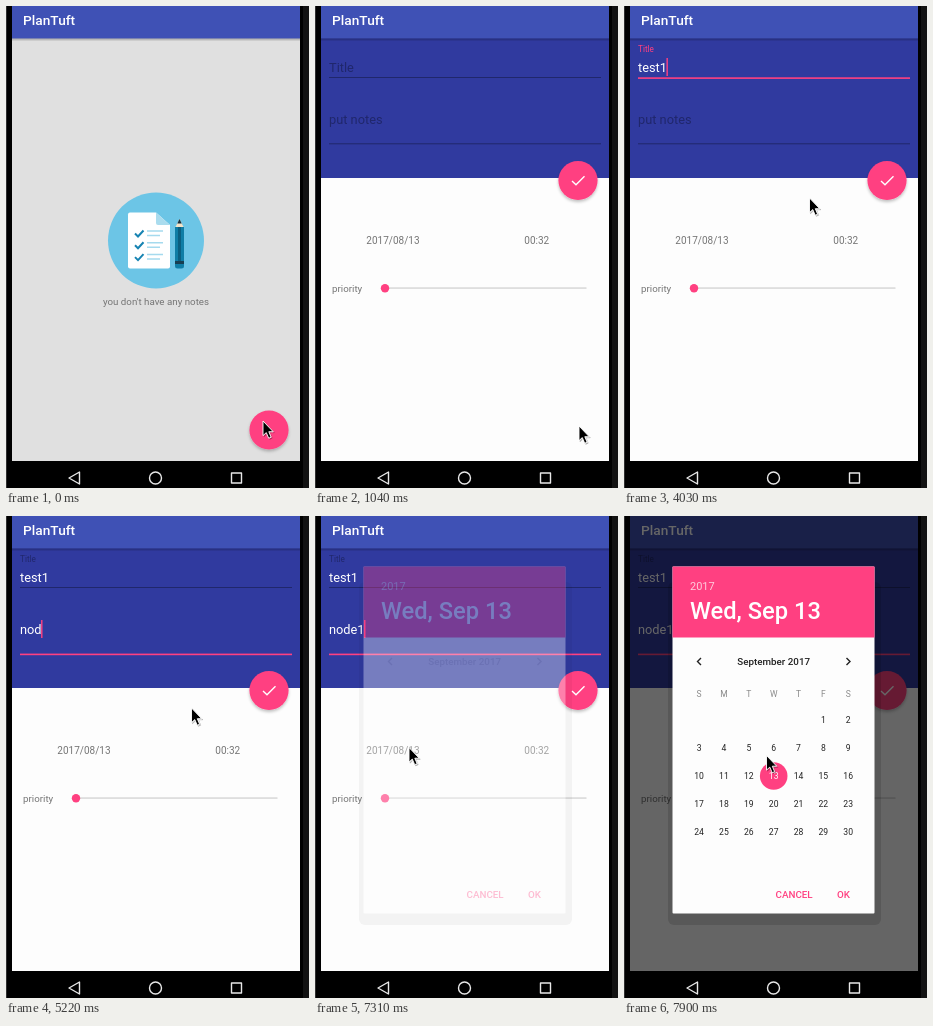
An HTML page that plays this animation: 303x482 px, repeating every 8000 ms.

```html
<!DOCTYPE html>
<html lang="en">
<head>
<meta charset="utf-8">
<title>Notes app</title>
<style>
  html, body { margin: 0; width: 100%; height: 100%; overflow: hidden; background: #000; }
  svg { display: block; width: 303px; height: 482px; font-family: Roboto, "Open Sans", sans-serif; }
  .small { font-size: 9.75px; fill: #757575; }
  .value { font-size: 10px; fill: #757575; }
  .field { font-size: 12.8px; fill: #fff; white-space: pre; }
  .hint { fill: #20276c; }
  .medium { font-weight: 500; }
  .mid { text-anchor: middle; }
  .pink { fill: #ff4081; }
  .line { fill: none; stroke-linecap: butt; }
</style>
</head>
<body>
<svg viewBox="0 0 303 482">
  <defs>
    <filter id="lift" x="-30%" y="-30%" width="160%" height="170%">
      <feDropShadow dx="0" dy="2" stdDeviation="1.8" flood-color="#000" flood-opacity=".24"/>
    </filter>
    <filter id="near" x="-30%" y="-30%" width="170%" height="170%">
      <feDropShadow dx="1" dy="1" stdDeviation=".7" flood-color="#000" flood-opacity=".3"/>
    </filter>
    <filter id="soft" x="-10%" y="-10%" width="120%" height="120%">
      <feGaussianBlur stdDeviation=".7"/>
    </filter>
    <linearGradient id="fade" x2="0" y2="1">
      <stop stop-color="#000" stop-opacity=".26"/>
      <stop offset="1" stop-color="#000" stop-opacity="0"/>
    </linearGradient>
    <clipPath id="screen"><rect x="6" width="288" height="455"/></clipPath>
  </defs>
  <rect width="303" height="482"/>
  <rect width="1" height="482" fill="#303030"/>
  <rect x="297" width="6" height="482" fill="#121212"/>

  <g clip-path="url(#screen)">
    <g id="home">
      <rect x="6" width="288" height="455" fill="#e0e0e0"/>
      <circle cx="150" cy="234.5" r="48" fill="#6cc5e6"/>
      <path d="M124 206.5H150L164 219V260.5Q164 262.5 162 262.5H124Q122 262.5 122 260.5V208.5Q122 206.5 124 206.5Z" fill="#fff"/>
      <path d="M150 206.5L164 219H152Q150 219 150 217Z" fill="#aadcee"/>
      <g id="items"></g>
      <path d="M169 222L173.5 213L178 222Z" fill="#f3e3c8"/>
      <path d="M171.3 217.5L173.5 213L175.7 217.5Z" fill="#17313f"/>
      <path d="M169 221H178V260Q178 262.5 175.5 262.5H171.5Q169 262.5 169 260Z" fill="#0f7ea6"/>
      <path d="M172 221H175V257H172Z" fill="#0a5f80"/>
      <path d="M169 255H178V258H169Z" fill="#173f52"/>
      <text class="small mid" x="150" y="298.5">you don't have any notes</text>
      <circle class="pink" cx="263" cy="424" r="19.6" filter="url(#lift)"/>
    </g>

    <g id="editor">
      <rect x="6" y="171" width="288" height="284" fill="#fdfdfd"/>
      <rect x="6" y="32" width="288" height="140" fill="#303a9f"/>
      <text id="label" class="hint" x="14">Title</text>
      <text id="title" class="field" x="14" y="66"></text>
      <rect id="titleLine" x="14" width="272"/>
      <text id="notesHint" class="field hint" x="14" y="118">put notes</text>
      <text id="notes" class="field" x="14" y="118"></text>
      <rect id="notesLine" x="14" width="272"/>
      <rect id="caret" class="pink" width="1.4" height="18"/>
      <text class="value" x="51.3" y="238">2017/08/13</text>
      <text class="value" x="209.3" y="238">00:32</text>
      <text class="small" x="17" y="286">priority</text>
      <rect x="70" y="281.2" width="201.5" height="1.8" fill="#dedede"/>
      <circle class="pink" cx="70" cy="282.3" r="4.2"/>
      <circle class="pink" cx="263" cy="174.5" r="19.6" filter="url(#lift)"/>
      <path class="line" d="M257 175L261 178.8L269.5 170.3" stroke="#fff" stroke-width="1.4"/>
    </g>

    <rect x="6" width="288" height="32.5" fill="#3f51b5"/>
    <rect x="6" y="32.5" width="288" height="3" fill="url(#fade)"/>
    <text class="medium" x="17" y="18.5" font-size="13.7" fill="#fff">PlanTuft</text>

    <rect id="dim" x="6" width="288" height="455" opacity="0"/>
    <g id="dialog">
      <rect x="44" y="66" width="213" height="343" rx="6" opacity=".12" filter="url(#soft)"/>
      <rect x="48.5" y="50.5" width="202" height="347" rx="1" fill="#fdfdfd"/>
      <rect class="pink" x="48.5" y="50.5" width="202" height="71"/>
      <text x="66" y="74" font-size="11" fill="#fff" fill-opacity=".72">2017</text>
      <text class="medium" x="66" y="102.5" font-size="23.7" fill="#fff">Wed, Sep 13</text>
      <g id="month">
        <text class="medium mid" x="149.7" y="149" font-size="9.8" fill="#222">September 2017</text>
        <path class="line" d="M77 142L73.5 145.5L77 149M222.5 142L226 145.5L222.5 149" stroke="#222" stroke-width="1.4"/>
      </g>
      <g id="days">
        <circle class="pink" cx="149.7" cy="260" r="13.8"/>
      </g>
      <text class="medium pink" x="151.5" y="382" font-size="9.8">CANCEL</text>
      <text class="medium pink" x="213" y="382" font-size="9.8">OK</text>
    </g>
  </g>

  <g class="line" stroke="#e8e8e8" stroke-width="1.4" stroke-linejoin="round">
    <path d="M63 472L73.5 466V478Z"/>
    <circle cx="149.5" cy="472" r="6"/>
    <rect x="225.5" y="467" width="10" height="10"/>
  </g>
  <path id="pointer" d="M0 0V14.6L3.3 11.6L5.7 17.2L8.1 16.2L5.8 10.7H10.2Z" stroke="#fff" stroke-width=".9" filter="url(#near)"/>
</svg>

<script>
const LOOP = 8000;
const PINK = '#ff4081', INK = '#20276c';
const ui = {};
document.querySelectorAll('svg [id]').forEach(el => ui[el.id] = el);

function add(parent, tag, attrs, text = '') {
  const el = document.createElementNS('http://www.w3.org/2000/svg', tag);
  set(el, attrs);
  el.textContent = text;
  parent.append(el);
}
function set(el, attrs) {
  for (const key in attrs) el.setAttribute(key, attrs[key]);
}

// Checklist on the empty-state picture
for (let i = 0; i < 3; i++) {
  const y = 227.5 + i * 11.8;
  add(ui.items, 'path', { d: `M129 ${y}l3 3l5.5 -6`, class: 'line', stroke: '#1683b2', 'stroke-width': 2 });
  add(ui.items, 'path', { d: `M141 ${y - 2.5}h16M141 ${y + 2}h13`, class: 'line', stroke: '#a5daee', 'stroke-width': 1.5 });
}

// Calendar grid; the month starts on a Friday
const colX = i => 75.1 + 24.85 * i;
[...'SMTWTFS'].forEach((d, i) =>
  add(ui.days, 'text', { class: 'mid', x: colX(i), y: 180.5, 'font-size': 8.5, fill: '#8a8a8a' }, d));
for (let day = 1; day <= 30; day++) {
  const cell = day + 4;
  add(ui.days, 'text', {
    class: 'mid', x: colX(cell % 7), y: 207 + 28 * Math.floor(cell / 7),
    'font-size': 8.6, fill: day === 13 ? '#fff' : '#222'
  }, day);
}

// Each row is a start time followed by the values held from then on
const pointerPath = [
  [0, 257, 415], [300, 258, 412], [450, 262, 417], [600, 264, 420],
  [1190, 250, 374], [1330, 212, 262], [1480, 185.5, 192],
  [6420, 182.5, 194], [6570, 165, 203], [6720, 135, 216], [6870, 108, 227],
  [7010, 94, 231.5], [7610, 105, 233], [7760, 127, 237], [7900, 142.5, 239.5]
];
const titleText = [[0, ''], [2380, 't'], [2530, 'te'], [2680, 'tes'], [2830, 'test'], [4030, 'test1']];
const notesText = [[0, ''], [4920, 'n'], [5070, 'no'], [5220, 'nod'], [5370, 'node'], [6120, 'node1']];
const labelRise = [[0, 0], [2530, .75], [2680, 1]];
const caretOn = [[0, 0], [2380, 1], [3280, 0], [3730, 1], [5820, 0], [6120, 1], [6570, 0], [7010, 1]];
// dialog, dim, month and day-grid opacity
const picker = [[0, 0, 0, 0, 0], [7310, .34, 0, .15, 0], [7460, 1, .6, 1, 1]];

function at(rows, t) {
  let held = rows[0];
  for (const row of rows) if (row[0] <= t) held = row;
  return held.slice(1);
}

function underline(el, y, active) {
  set(el, { y: active ? y + .3 : y, height: active ? 1.6 : 1, fill: active ? PINK : INK });
}

function draw(t) {
  const editing = t >= 1040;
  const onTitle = t >= 2380 && t < 4470, onNotes = t >= 4470;
  ui.home.style.display = editing ? 'none' : '';
  ui.editor.style.display = editing ? '' : 'none';

  const [title] = at(titleText, t), [notes] = at(notesText, t), [rise] = at(labelRise, t);
  ui.title.textContent = title;
  ui.notes.textContent = notes;
  ui.notesHint.style.display = notes ? 'none' : '';
  set(ui.label, { y: 66 - 20 * rise, 'font-size': 12.8 - 4.6 * rise });
  ui.label.style.fill = onTitle && rise ? PINK : INK;
  underline(ui.titleLine, 71, onTitle);
  underline(ui.notesLine, 137.3, onNotes);

  const typed = onNotes ? ui.notes : ui.title;
  const width = typed.textContent && editing ? typed.getComputedTextLength() : 0;
  set(ui.caret, { x: 13.5 + width, y: onNotes ? 104 : 52, opacity: at(caretOn, t)[0] });

  const [dialog, dim, month, days] = at(picker, t);
  set(ui.dialog, { opacity: dialog });
  set(ui.dim, { opacity: dim });
  set(ui.month, { opacity: month });
  set(ui.days, { opacity: days });

  set(ui.pointer, { transform: `translate(${at(pointerPath, t)})` });
}

const start = performance.now();
function tick() {
  draw((performance.now() - start) % LOOP);
  requestAnimationFrame(tick);
}
tick();
</script>
</body>
</html>
```
